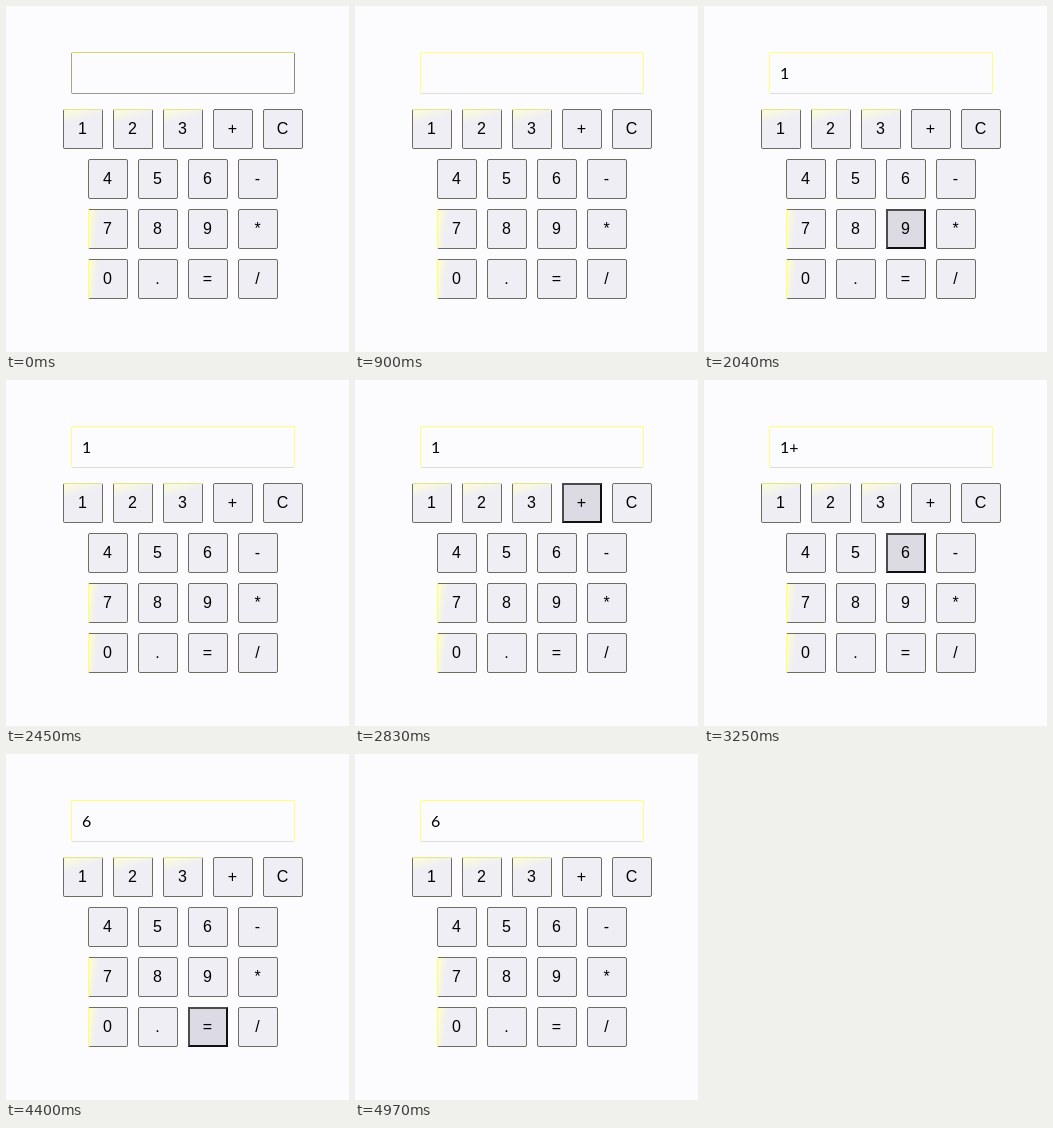
These frames come from a looping animation (343x346 px, 5.65 s). An HTML page:

```html
<!DOCTYPE html>
<html lang="en">
<head>
<meta charset="utf-8">
<title>Calculator</title>
<style>
html, body { margin: 0; width: 100%; height: 100%; overflow: hidden; background: #fcfcff; }
div { position: absolute; box-sizing: border-box; color: #000; }
#screen {
  left: 65px; top: 46px; width: 224px; height: 42px; padding-left: 10px;
  font: 16px/40px Lato, sans-serif;
  border: 1px solid #ffff78; border-bottom-color: #deded8; border-radius: 2px; background: #fcfcff;
}
#screen.idle { border-color: #d6d66c #8c8c78 #99998c #a8a87c; }
.key {
  width: 40px; height: 40px; text-align: center; text-indent: -1px;
  font: 16px/38px "Liberation Sans", Arial, sans-serif;
  border: 1px solid #6c6c62; border-radius: 2px; background: #efeef4;
}
.top { border-top-color: #e4e490; background: linear-gradient(165deg, #fdfdd8, #efeef4 30%); }
.left { border-left-color: #ffff70; background: linear-gradient(97deg, #ffffc8, #efeef4 24%); }
.key.hover {
  border: 2px solid #111; border-top-color: #4c4c4c; border-left-color: #4c4c4c;
  border-radius: 0; background: #dcdbe4; line-height: 36px;
}
</style>
</head>
<body>
<div id="screen"></div>
<script>
const LOOP = 5650;
const display = document.getElementById('screen');
const keys = {};

['123+C', '456-', '789*', '0.=/'].forEach((row, r) => {
  [...row].forEach((label, c) => {
    const key = document.createElement('div');
    key.className = 'key' + ('123'.includes(label) ? ' top' : '70'.includes(label) ? ' left' : '');
    key.style.left = (r ? 82 : 57) + c * 50 + 'px';
    key.style.top = 103 + r * 50 + 'px';
    key.textContent = label;
    document.body.append(key);
    keys[label] = key;
  });
});

// Key under the pointer from each time on; '' is a gap between keys
const pointer = [
  [0, ''], [300, '+'], [340, '3'], [400, ''], [780, '2'], [900, ''],
  [1650, '1'], [1800, ''], [1850, '4'], [1900, ''], [1950, '5'], [1995, ''],
  [2040, '9'], [2070, ''], [2120, '*'], [2170, ''], [2220, '/'],
  [2370, ''], [2410, '*'], [2450, ''], [2480, '-'], [2600, ''], [2830, '+'],
  [3100, ''], [3250, '6'], [3400, ''], [3470, '5'],
  [3860, ''], [3940, '8'], [3970, ''], [4030, '='],
  [4640, ''], [4660, '-'], [4690, 'C'], [4970, '']
];
const texts = [[0, ''], [1650, '1'], [3030, '1+'], [3680, '1+5'], [4400, '6']];

const at = (track, t) => track.findLast(([start]) => start <= t)[1];

function draw(now) {
  const t = now % LOOP;
  const over = at(pointer, t);
  for (const label in keys) keys[label].classList.toggle('hover', label === over);
  display.textContent = at(texts, t);
  display.classList.toggle('idle', t < 300);
  requestAnimationFrame(draw);
}
draw(0);
</script>
</body>
</html>
```
